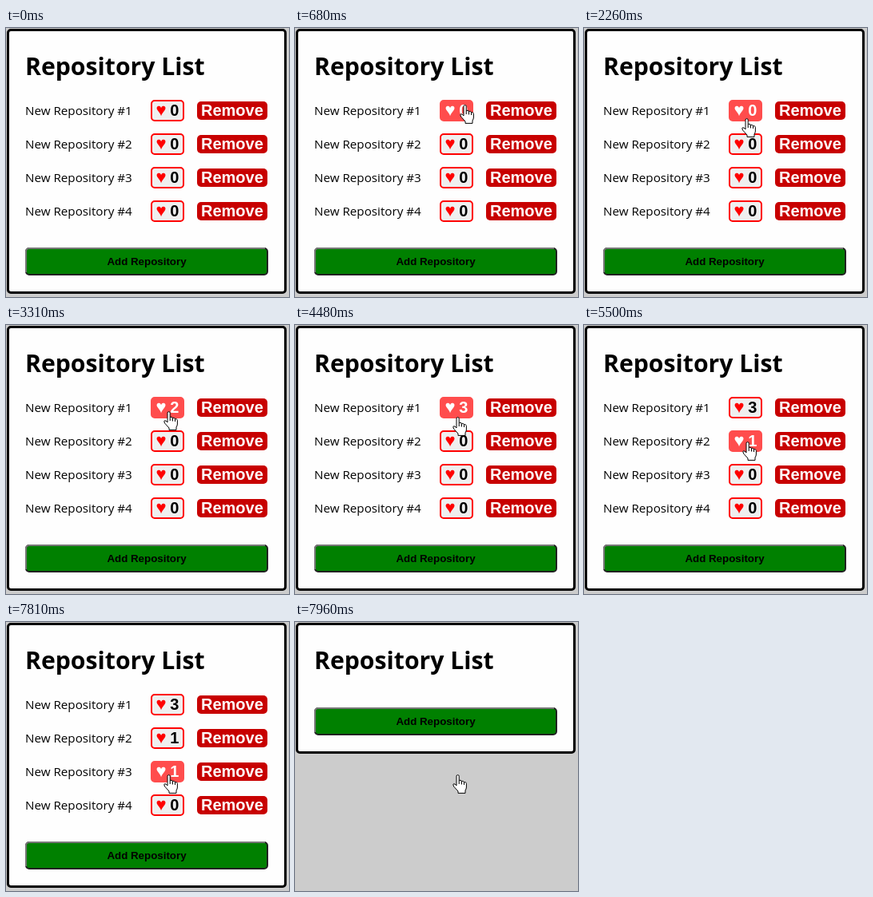
Recreate the animation shown at these times as an HTML page. Size 354x337 px, loop 8 s.

```html
<!DOCTYPE html>
<html lang="en">
<head>
<meta charset="utf-8">
<title>Repository List</title>
<style>
  html, body { margin: 0; width: 100%; height: 100%; overflow: hidden; background: #ccc; }
  svg { display: block; }
  text { font: bold 20px "Liberation Sans", Arial, sans-serif; white-space: pre; }
  .title { font: bold 30.2px "Open Sans", "Noto Sans", sans-serif; }
  .name { font: 15.2px "Open Sans", "Noto Sans", sans-serif; }
  .add text { font-size: 13.333px; }
  .like rect { fill: #efefef; stroke: #f00; stroke-width: 2; }
  .like .heart { fill: #f00; font-size: 22px; }
  .like.hover rect { fill: #ff4d4d; stroke: #ff4d4d; }
  .like.hover text { fill: #fff; }
  .remove rect { fill: #c80000; }
  .remove text { fill: #fff; }
  .cursor path { fill: #fff; stroke: #000; }
</style>
</head>
<body>
<svg width="354" height="337" viewBox="0 0 354 337">
  <rect id="card" x="2.5" y="2.5" width="347" rx="3.5" fill="#fefefe" stroke="#000" stroke-width="3"/>
  <text class="title" x="24" y="59">Repository List</text>
  <g id="rows"></g>
  <g id="add" class="add">
    <rect x="25" y="276" width="302" height="33" rx="4" fill="#008000" stroke="#212121" stroke-width="2"/>
    <path d="M25 306V280A4 4 0 0 1 29 276H324" fill="none" stroke="#767676" stroke-width="2"/>
    <text x="176" y="297" text-anchor="middle">Add Repository</text>
  </g>
  <g id="cursor" class="cursor">
    <g id="hand" transform="translate(-6 0)">
      <path d="M5 14V2.2Q5 .6 6.6 .6T8.2 2.2V8Q8.5 7 10 7.3T11.5 9Q12 8 13.2 8.4T14.5 10Q15 9.3 16.2 9.8T17.4 11.5V16Q17.4 18 16 20V23.4H7V21L2 15.5Q-.2 12.4 1.4 11.8T5 14Z"/>
      <path d="M8.2 8V12M11.5 9V12.5M14.5 10V13"/>
    </g>
    <path id="arrow" d="M.5 .5V16.5L4.2 13 6.6 18.4 9 17.4 6.7 12.2H11.7Z"/>
    <circle id="press" r="12" fill="#ff0" fill-opacity=".47"/>
  </g>
</svg>
<script>
const LOOP = 8000, ENTER = 320, RELOAD = 7480, RELOADED = 7810, CLEARED = 7960;
const ROWS = 4, ROW_STEP = 42;
const CLICK_GAP = 690, CLICK_HOLD = 150;
const LEAD = 30; // a move is already under way when it first shows

const entry = { x: 262, y: 348 };
const moves = [
  { start: ENTER, time: 390, x: 212, y: 96 },
  { start: 1290, time: 110, x: 208, y: 107 },
  { start: 1800, time: 110, x: 202, y: 119 },
  { start: 2260, time: 100, x: 203, y: 108 },
  { start: 4480, time: 300, x: 204, y: 142 },
  { start: 5500, time: 700, x: 203, y: 191 }
];

// First release and number of clicks, row by row
const clicks = [
  { first: 2620, count: 3 }, { first: 5220, count: 1 }, { first: 6270, count: 1 }
];

const $ = id => document.getElementById(id);
const clamp = (v, lo, hi) => Math.min(hi, Math.max(lo, v));
const easeOut = p => 1 - (1 - p) ** 2;
const show = (el, on) => el.style.display = on ? '' : 'none';

$('rows').innerHTML = Array.from({ length: ROWS }, (_, i) => `
  <g transform="translate(0 ${i * ROW_STEP})">
    <text class="name" x="24" y="109">New Repository #${i + 1}</text>
    <g class="like">
      <rect x="182" y="91" width="40" height="25" rx="4"/>
      <text class="heart" x="187.4" y="110">♥</text>
      <text class="count" x="205.2" y="110">0</text>
    </g>
    <g class="remove">
      <rect x="239" y="92" width="88" height="23" rx="5"/>
      <text x="244" y="110">Remove</text>
    </g>
  </g>`).join('');

const likes = [...document.querySelectorAll('.like')];
const counts = likes.map(like => like.querySelector('.count'));

function pointerAt(t) {
  let { x, y } = entry;
  for (const move of moves) {
    const p = easeOut(clamp((t + LEAD - move.start) / move.time, 0, 1));
    x += (move.x - x) * p;
    y += (move.y - y) * p;
  }
  return { x: Math.round(x), y: Math.round(y) };
}

function likesAt(t, row) {
  const click = clicks[row];
  return click ? clamp(Math.floor((t - click.first) / CLICK_GAP) + 1, 0, click.count) : 0;
}

function render(t) {
  const cleared = t >= CLEARED;
  const shift = cleared ? ROWS * ROW_STEP : 0;
  show($('rows'), !cleared);
  $('card').setAttribute('height', 329 - shift);
  $('add').setAttribute('transform', `translate(0 ${-shift})`);

  const { x, y } = pointerAt(t);
  const visible = t >= ENTER;
  const overLike = row => visible && x >= 181 && x < 223 &&
    y >= 90 + row * ROW_STEP && y < 117 + row * ROW_STEP;
  likes.forEach((like, row) => {
    like.classList.toggle('hover', overLike(row));
    counts[row].textContent = likesAt(t, row);
  });

  const overAdd = y >= 275 && y < 310;
  const reloading = t >= RELOAD && t < RELOADED;
  const hand = !reloading && (overAdd || likes.some((_, row) => overLike(row)));
  show($('cursor'), visible);
  show($('hand'), hand);
  show($('arrow'), !hand);
  show($('press'), clicks.some((_, row) => likesAt(t + CLICK_HOLD, row) > likesAt(t, row)));
  $('cursor').setAttribute('transform', `translate(${x} ${y})`);
}

const start = performance.now();
function tick() {
  render((performance.now() - start) % LOOP);
  requestAnimationFrame(tick);
}
tick();
</script>
</body>
</html>
```
